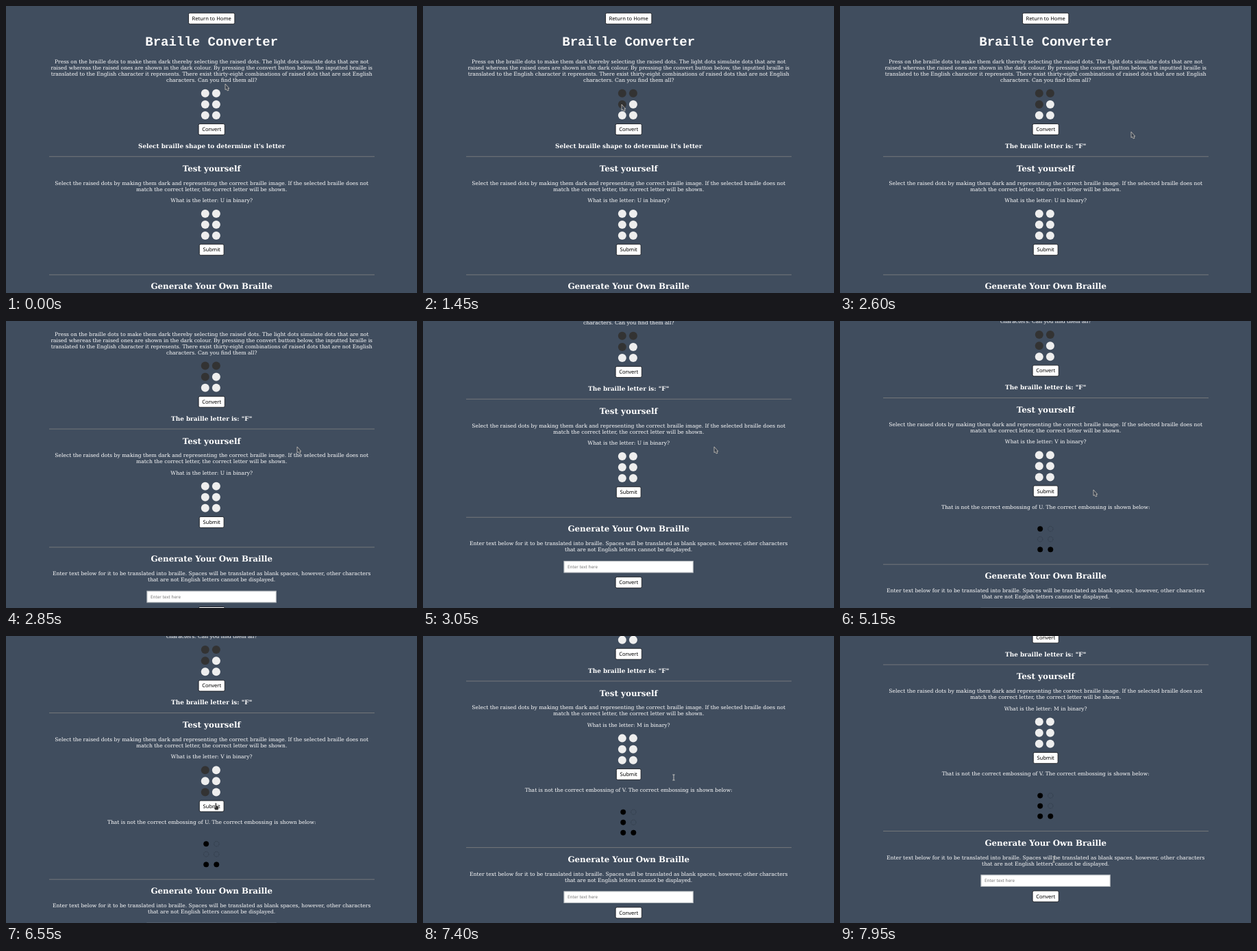
An HTML page that plays this animation: 600 px wide and 420 px high, repeating every 8 s.

```html
<!DOCTYPE html>
<html lang="en">
<head>
<meta charset="utf-8">
<title>Braille Converter</title>
<style>
  html, body { margin: 0; width: 100%; height: 100%; overflow: hidden; background: #404d5e; }
  svg { display: block; width: 100%; height: 100%; }
  text { fill: #fff; text-anchor: middle; text-rendering: geometricPrecision; font: 7.6px "DejaVu Serif", serif; }
  .title { font: bold 19px "Liberation Mono", monospace; }
  .section { font-size: 11.87px; font-weight: bold; }
  .answer { font-size: 8.89px; font-weight: bold; }
  .button rect { fill: #fff; stroke: #14161a; stroke-width: .85px; }
  .button text { fill: #000; font-family: "Noto Sans", sans-serif; }
  .field { fill: #fff; stroke: #b4b9bd; stroke-width: 1.1px; }
  .hint { fill: #757575; text-anchor: start; font: 6.33px "Noto Sans", sans-serif; }
  .rule { fill: #77797c; }
  .dot { fill: #eee; }
  .dot.on { fill: #333; }
  .pip { fill: none; stroke: #2b3441; stroke-width: .6px; stroke-dasharray: 1.6 .9; }
  .pip.on { fill: #000; stroke: #000; stroke-dasharray: none; }
  .pointer { fill: #3a4350; stroke: #ddd6ca; stroke-width: .7px; stroke-linejoin: round; }
  .hand { fill: #333; stroke: #d9d9d9; }
  .beam { fill: none; stroke: #d5d3cc; stroke-width: .9px; }
</style>
</head>
<body>
<svg viewBox="0 0 600 420" preserveAspectRatio="none">
  <g id="page">
    <g id="upper"></g>
    <g id="result"></g>
    <g id="lower"></g>
  </g>
  <g id="cursor">
    <path class="pointer" d="M0 0V8.6L1.7 7.4 3.1 10 5 9.3 3.9 6.6H5.8Z"/>
    <path class="pointer hand" d="M-1 1Q-1 0 0 0T1 1V4Q4.2 4.2 4.2 6.4V8L3.3 10.4H-1L-3.2 6.4Q-2.4 5.3-1 6.6Z"/>
    <path class="beam" d="M-1.6-4H1.6M0-4V4M-1.6 4H1.6"/>
  </g>
</svg>
<script>
const LOOP = 8000, STEP = 50, GLIDE = 250;
const CENTER = 300.2, LINE = 9, RESULT_HEIGHT = 70.6, FIRST_SCROLL = 107.7;
const ARROW = 0, HAND = 1, BEAM = 2;
const $ = id => document.getElementById(id);

function add(parent, tag, attrs, content = '') {
  const el = document.createElementNS('http://www.w3.org/2000/svg', tag);
  for (const key in attrs) el.setAttribute(key, attrs[key]);
  el.textContent = content;
  parent.append(el);
  return el;
}
const label = (parent, y, content, cls = '') =>
  add(parent, 'text', { x: CENTER, y, class: cls }, content);
const paragraph = (parent, y, lines) =>
  lines.forEach((line, i) => label(parent, y + i * LINE, line));
const rule = (parent, y) =>
  add(parent, 'rect', { x: 63, y, width: 475, height: .95, class: 'rule' });

function button(parent, cy, width, content) {
  const g = add(parent, 'g', { class: 'button' });
  add(g, 'rect', { x: CENTER - width / 2, y: cy - 8, width, height: 16, rx: 2 });
  label(g, cy + 2.7, content);
}

// Braille order: 0-2 down the left column, 3-5 down the right.
const cell = (parent, x, y, gap, r, cls) => Array.from({ length: 6 }, (_, i) =>
  add(parent, 'circle', { cx: x + (i > 2 ? gap : 0), cy: y + i % 3 * gap, r, class: cls }));

const upper = $('upper'), lower = $('lower'), result = $('result');

button(upper, 18.3, 67.3, 'Return to Home');
label(upper, 57.7, 'Braille Converter', 'title');
paragraph(upper, 83.9, [
  'Press on the braille dots to make them dark thereby selecting the raised dots. The light dots simulate dots that are not',
  'raised whereas the raised ones are shown in the dark colour. By pressing the convert button below, the inputted braille is',
  'translated to the English character it represents. There exist thirty-eight combinations of raised dots that are not English',
  'characters. Can you find them all?'
]);
const inputDots = cell(upper, 290.8, 127.8, 16.1, 6, 'dot');
button(upper, 180.5, 38.2, 'Convert');
const answer = label(upper, 208.2, '', 'answer');
rule(upper, 219.8);

label(upper, 241.8, 'Test yourself', 'section');
paragraph(upper, 261.6, [
  'Select the raised dots by making them dark and representing the correct braille image. If the selected braille does not',
  'match the correct letter, the correct letter will be shown.'
]);
const question = label(upper, 287.2, '');
const testDots = cell(upper, 290.8, 303.9, 16.1, 6, 'dot');
button(upper, 356.7, 35.8, 'Submit');

const verdict = label(result, 382.4, '');
const pips = cell(result, 292.2, 411.9, 15.1, 3.7, 'pip');

rule(lower, 392.8);
label(lower, 414.4, 'Generate Your Own Braille', 'section');
paragraph(lower, 434.4, [
  'Enter text below for it to be translated into braille. Spaces will be translated as blank spaces, however, other characters',
  'that are not English letters cannot be displayed.'
]);
add(lower, 'rect', { x: 205.9, y: 457.5, width: 188.4, height: 16.6, class: 'field' });
add(lower, 'text', { x: 211, y: 468, class: 'hint' }, 'Enter text here');
button(lower, 488.7, 38.2, 'Convert');

// The cursor glides to each stop, arriving at its time, and clicks what is there.
const hover = (x, y, shape = ARROW) => ({ x, y, shape });
const pressDot = (dots, i) => ({
  ...hover(i > 2 ? 300 : 290, (dots === inputDots ? 128 : 194) + i % 3 * 16), dots, i
});
const convert = { ...hover(302, 176, HAND), action: 'convert' };
const submit = { ...hover(307, 245, HAND), action: 'submit' };
const stops = [
  [0, hover(320, 114)],
  [250, hover(282, 124)],
  [600, pressDot(inputDots, 0)],
  [850, pressDot(inputDots, 3)],
  [1250, pressDot(inputDots, 1)],
  [1700, convert],
  [2600, hover(425, 184)],
  [3600, pressDot(testDots, 0)],
  [4000, pressDot(testDots, 3)],
  [4350, submit],
  [5000, hover(370, 247)],
  [5550, pressDot(testDots, 0)],
  [6200, pressDot(testDots, 2)],
  [6600, submit],
  [7150, hover(366, 207, BEAM)],
  [7950, hover(312, 327, BEAM)]
].map(([at, stop]) => ({ at, ...stop }));

const LETTERS = 'UVM';
const RAISED = { U: [0, 2, 5], V: [0, 1, 2, 5] };

const clamp = v => Math.min(1, Math.max(0, v));
const easeOut = (t, start, length, power = 2) => 1 - (1 - clamp((t - start) / length)) ** power;
const mark = (dots, chosen) => dots.forEach((dot, i) => dot.classList.toggle('on', chosen.includes(i)));
const shift = (el, x, y) => el.setAttribute('transform', `translate(${x} ${y})`);
const show = (el, on) => el.setAttribute('visibility', on ? 'visible' : 'hidden');

function drawPage(t) {
  let converted = false, round = 0, input = [], test = [];
  for (const { dots, i, action } of stops.filter(s => s.at <= t)) {
    if (dots) (dots === inputDots ? input : test).push(i);
    if (action === 'convert') converted = true;
    if (action === 'submit') { round++; test = []; }
  }
  answer.textContent = converted
    ? 'The braille letter is: "F"' : "Select braille shape to determine it's letter";
  question.textContent = `What is the letter: ${LETTERS[round]} in binary?`;
  mark(inputDots, input);
  mark(testDots, test);

  show(result, round);
  if (round) {
    const letter = LETTERS[round - 1];
    verdict.textContent =
      `That is not the correct embossing of ${letter}. The correct embossing is shown below:`;
    mark(pips, RAISED[letter]);
  }
  shift(lower, 0, round ? RESULT_HEIGHT : 0);
  const scroll = FIRST_SCROLL * easeOut(t, 2750, 400, 3) + RESULT_HEIGHT * easeOut(t, 7200, 480);
  shift($('page'), 0, -scroll);
}

function drawCursor(t) {
  const next = stops.findIndex(s => s.at > t);
  const to = stops.at(next), from = next > 0 ? stops[next - 1] : to;
  const u = easeOut(t, to.at - GLIDE, GLIDE);
  shift($('cursor'), from.x + (to.x - from.x) * u, from.y + (to.y - from.y) * u);
  const shape = (u > .5 ? to : from).shape;
  [...$('cursor').children].forEach((el, i) => show(el, i === shape));
}

const begin = performance.now();
function frame() {
  const t = Math.floor((performance.now() - begin) % LOOP / STEP) * STEP;
  drawPage(t);
  drawCursor(t);
  requestAnimationFrame(frame);
}
frame();
</script>
</body>
</html>
```
